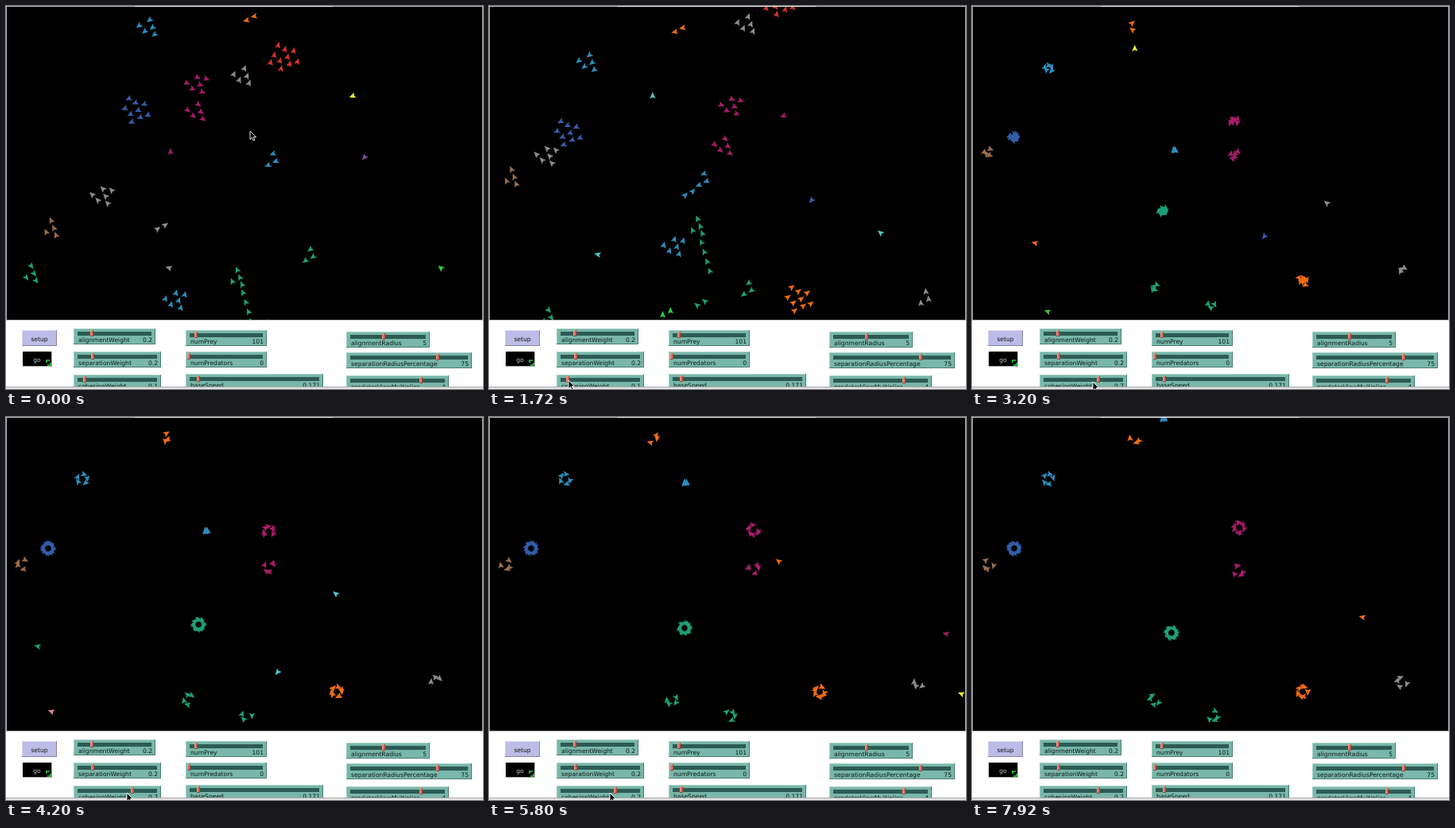
An HTML page with a canvas for the animation above (8000 ms loop, 600 px wide and 481 px high).

```html
<!DOCTYPE html>
<html lang="en">
<head>
<meta charset="utf-8">
<title>Flocking model</title>
<style>
  html, body { margin: 0; width: 600px; height: 481px; overflow: hidden; background: #fff; }
  canvas, svg { position: absolute; left: 0; top: 0; display: block; }
  text { font: 7.6px "DejaVu Sans", sans-serif; fill: #0c1a18; }
  .end { text-anchor: end; }
  .mid { text-anchor: middle; }
</style>
</head>
<body>
<canvas id="world" width="600" height="395"></canvas>
<svg id="panel" width="600" height="481"></svg>
<script>
const C = {
  grey: '#8d8d8d', red: '#d73229', orange: '#f16a15', brown: '#9d6e48', yellow: '#eded31',
  green: '#59b03c', lime: '#2cd13b', turquoise: '#1d9f78', cyan: '#54c4c4', sky: '#2d8dbe',
  blue: '#345da9', violet: '#7c50a4', magenta: '#a71b6a', pink: '#e07f96'
};
const PALETTE = Object.values(C);
const LOOP = 8000, FPS = 15, WIDTH = 598, SPEED = 40.5;
const SETTLED = 3.2, END = 7.93; // seconds: rings have formed, last step
const GOLDEN = Math.PI * (3 - Math.sqrt(5));

const clamp = v => Math.min(1, Math.max(0, v));
const smooth = v => (v = clamp(v), v * v * (3 - 2 * v));
const mix = (a, b, f) => a + (b - a) * f;
const hash = n => Math.abs(Math.sin(n * 12.9898 + 4) * 43758.5453) % 1;

// ---- the birds ----
const birds = [];

// A circle of birds whose centre drifts from (x, y) to (x2, y2).
const ring = (color, x, y, x2 = x, y2 = y, r = 6.3, spin = SPEED / r) =>
  ({ color, x, y, x2, y2, r, spin, size: 0 });

const cluster = i => {
  const r = 6 * Math.sqrt(i + .5), a = GOLDEN * i;
  return [r * Math.cos(a), r * Math.sin(a)];
};
const file = i => [3.5 * i, 12 * i];

// Birds that fly straight at the given heading (degrees) until they join a ring.
function flock(color, count, x, y, heading, home, join = 1.9, formation = cluster) {
  const a = heading * Math.PI / 180, vx = SPEED * Math.cos(a), vy = SPEED * Math.sin(a);
  for (let i = 0; i < count; i++) {
    const [dx, dy] = count > 1 ? formation(i) : [0, 0];
    birds.push({ color, x: x + dx, y: y + dy, vx, vy, home, join, noise: hash(birds.length), slot: home ? home.size++ : 0 });
  }
}

// A bird without neighbours has no colour of its own and flickers.
const loner = (x, y, heading, home, join) => flock(null, 1, x, y, heading, home, join);

const skyRing = ring(C.sky, 96, 78);
const skyBunch = ring(C.sky, 255, 181, 241, 2, 1.5, 0);
const orangeTop = ring(C.orange, 205, 26);
const orangeLow = ring(C.orange, 416, 345);
const magentaTop = ring(C.magenta, 329, 145, 336, 139);
const magentaLow = ring(C.magenta, 330, 187, 335, 193);
const blueRing = ring(C.blue, 53, 165);
const brownRing = ring(C.brown, 21, 185);
const greenRing = ring(C.turquoise, 240, 258, 251, 271);
const greenLeft = ring(C.turquoise, 230, 355);
const greenRight = ring(C.turquoise, 303, 375);
const greyRing = ring(C.grey, 541, 333);

flock(C.sky, 5, 180, 27, 141, skyRing);
flock(C.orange, 2, 308, 13, 168, orangeTop);
flock(C.red, 10, 350, 64, -77);
flock(C.grey, 5, 299, 88, -68);
flock(C.magenta, 6, 240, 99, 23, magentaTop);
flock(C.magenta, 5, 241, 133, 38, magentaLow);
flock(C.blue, 9, 162, 131, 156, blueRing);
flock(C.grey, 6, 121, 239, -134, blueRing);
flock(C.sky, 3, 335, 195, 159, skyBunch);
flock(C.grey, 2, 196, 275, -37, skyBunch, 1.7);
flock(C.brown, 4, 56, 279, -114, brownRing);
flock(C.turquoise, 4, 31, 336, 52);
flock(C.turquoise, 4, 290, 341, -114, greenRing);
flock(C.turquoise, 4, 298, 360, -116, greenRing, 1.9, file);
flock(C.sky, 6, 213, 370, -74, greenRing);
flock(C.turquoise, 2, 321, 416, -140, greenLeft);
flock(C.lime, 2, 224, 453, -90, greenLeft);
flock(C.turquoise, 3, 382, 315, 143, greenRight);
flock(C.orange, 9, 333, 411, -38, orangeLow);
flock(C.grey, 3, 556, 438, -96, greyRing);

loner(436, 113, 159, magentaTop);
loner(207, 183, -91, orangeTop, 3.5);
loner(451, 190, 130, greenRight, 5);
loner(205, 329, -166);
loner(547, 329, -141, magentaTop, 6.4);
loner(217, 428, -160, greyRing, 6.7);

function place(bird, t) {
  const x = bird.x + bird.vx * t, y = bird.y + bird.vy * t, home = bird.home;
  if (!home || t < bird.join) return [x, y];
  const f = smooth(t - bird.join), drift = clamp((t - SETTLED) / (END - SETTLED));
  const cx = mix(home.x, home.x2, drift), cy = mix(home.y, home.y2, drift);
  const nearX = cx + WIDTH * Math.round((x - cx) / WIDTH);
  const angle = (bird.slot + bird.noise) / home.size * 2 * Math.PI + home.spin * t;
  const r = home.r * (1 - bird.noise * clamp(4 - t));
  return [mix(x, nearX + r * Math.cos(angle), f), mix(y, cy + r * Math.sin(angle), f)];
}

function colorOf(bird, t, k) {
  if (bird.home && t >= bird.join) return bird.home.color;
  return bird.color || PALETTE[Math.floor(hash(k + 7 * bird.noise) * PALETTE.length)];
}

// ---- the world ----
const ctx = document.getElementById('world').getContext('2d');

function fill(color, x, y, w, h) {
  ctx.fillStyle = color;
  ctx.fillRect(x, y, w, h);
}

function arrow(x, y, heading, color) {
  ctx.save();
  ctx.translate(x, y);
  ctx.rotate(heading);
  ctx.beginPath();
  ctx.moveTo(4.7, 0);
  ctx.lineTo(-3.4, 3.6);
  ctx.lineTo(-1.9, 0);
  ctx.lineTo(-3.4, -3.6);
  ctx.fillStyle = color;
  ctx.fill();
  ctx.restore();
}

function drawWorld(t, k) {
  fill('#000', 0, 0, 600, 395);
  for (const bird of birds) {
    const [x, y] = place(bird, t), [ax, ay] = place(bird, t - .03), [bx, by] = place(bird, t + .03);
    const wx = (x % WIDTH + WIDTH) % WIDTH, heading = Math.atan2(by - ay, bx - ax);
    const color = colorOf(bird, t, k);
    arrow(wx, y, heading, color);
    if (wx < 6) arrow(wx + WIDTH, y, heading, color);
  }
  const edge = '#b8b8b8';
  fill(edge, 0, 0, 600, 1);
  fill('#f2f2f2', 162, 0, 249, 1);
  fill(edge, 0, 0, 1, 394);
  fill(edge, 599, 0, 1, 395);
  fill(edge, 0, 394, 600, 1);
}

// ---- the controls ----
const rect = (x, y, w, h, color) =>
  `<rect x="${x}" y="${y}" width="${w}" height="${h}" fill="${color}" shape-rendering="crispEdges"/>`;
const box = (x, y, w, h, color, light, dark) =>
  rect(x, y, w, h, dark) + rect(x, y, w - 1, h - 1, light) + rect(x + 1, y + 1, w - 2, h - 2, color);

// level: knob place along the track, 0 to 1
function slider(label, value, x, y, w, level) {
  const knob = Math.round(x + 4 + level * (w - 10));
  return box(x, y, w, 20, '#78b7a9', '#a4d0c6', '#4b7d73') +
    rect(x + 5, y + 4, w - 10, 5, '#2c5b53') +
    `<g id="${label}Knob">${box(knob - 2, y + 2, 4, 8, '#e0705f', '#eb9a8e', '#a8483c')}</g>` +
    `<text x="${x + 6}" y="${y + 17}">${label}</text>` +
    `<text id="${label}Value" class="end" x="${x + w - 4}" y="${y + 17}">${value}</text>`;
}

const panel = document.getElementById('panel');
panel.innerHTML =
  box(20, 407, 44, 20, '#bcbce6', '#d8d8f0', '#8585a8') +
  '<text class="mid" x="42" y="420.5">setup</text>' +
  box(21, 434, 37, 19, '#000', '#000', '#aaa') +
  '<text class="mid" x="39" y="446.5" style="fill:#c8c8c8">go</text>' +
  '<path d="M51 448V445H55M56 448V451H52" fill="none" stroke="#2cd13b" stroke-width="1.6"/>' +
  slider('alignmentWeight', '0.2', 85, 405, 103, .2) +
  slider('separationWeight', '0.2', 85, 434, 110, .2) +
  slider('cohesionWeight', '0.1', 85, 463, 110, .1) +
  slider('numPrey', '101', 226, 407, 102, .1) +
  slider('numPredators', '0', 226, 434, 102, 0) +
  slider('baseSpeed', '0.171', 226, 462, 173, .075) +
  slider('alignmentRadius', '5', 428, 409, 105, .45) +
  slider('separationRadiusPercentage', '75', 428, 435, 158, .75) +
  slider('predatorViewMultiplier', '4', 428, 464, 129, .76) +
  rect(0, 478, 600, 3, '#e4e4e4') + rect(0, 478, 600, 1, '#a8a8a8') +
  '<path id="cursor" d="M0 0V10.5L2.5 8.3L4.3 12L6 11.2L4.3 7.6H7.5Z" fill="#000" stroke="#fff" stroke-width=".9"/>';

const [knob, value, cursor] = ['cohesionWeightKnob', 'cohesionWeightValue', 'cursor']
  .map(id => document.getElementById(id));

// The pointer goes to the cohesion knob, drags it right and later leaves downwards.
function drawControls(t) {
  const reach = smooth((t - .2) / 1.25), drag = clamp((t - 1.8) / .7), leave = clamp((t - 7.2) / .3);
  const dive = smooth((t - .2) / .85);
  const x = mix(307, 100, reach) + 52 * drag, y = mix(157, 470, dive) + 2 * drag + 20 * leave;
  cursor.setAttribute('transform', `translate(${x} ${y})`);
  knob.setAttribute('transform', `translate(${Math.round(60 * drag)} 0)`);
  value.textContent = (.1 + .6 * drag).toFixed(1);
}

// Steps at 15 per second, shown on a 40 ms grid.
const start = performance.now();
function frame() {
  const ms = Math.max(0, performance.now() - start) % LOOP;
  const k = Math.floor(Math.floor(ms / 40) * .6 + .3), t = k / FPS;
  drawWorld(t, k);
  drawControls(t);
  requestAnimationFrame(frame);
}
frame();
</script>
</body>
</html>
```
